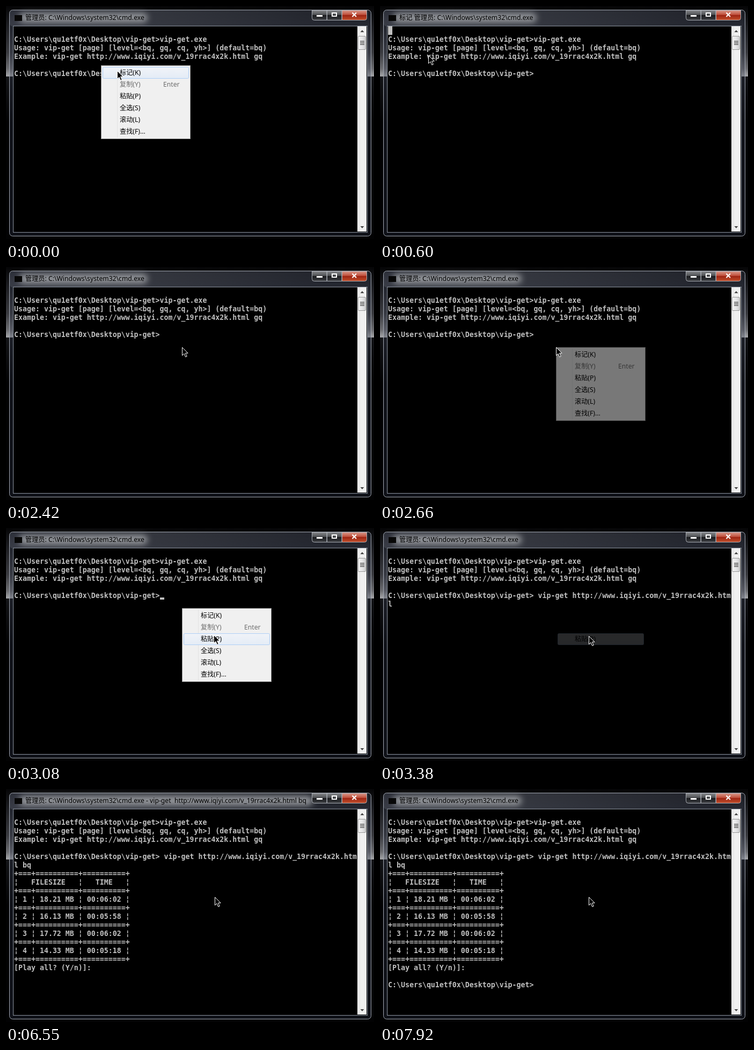
Animation of 686x436 px, one loop 8 s. Source, as an HTML page:

```html
<!DOCTYPE html>
<html lang="zh-CN">
<head>
<meta charset="utf-8">
<title>Console</title>
<style>
html, body { margin: 0; width: 100%; height: 100%; overflow: hidden; background: #000; }
svg { display: block; width: 686px; height: 436px; }
text { white-space: pre; }
.term { font: bold 13.288px "DejaVu Sans Mono", monospace; fill: #c0c0c0; }
.term .inverse { fill: #000; }
.ui { font: 12.2px "Noto Sans", "Noto Sans CJK SC", "Noto Sans CJK", sans-serif; fill: #000; }
.ui .off { fill: #6d6d6d; }
</style>
</head>
<body>
<svg viewBox="0 0 686 436">
  <defs>
    <linearGradient id="desk" x2="0" y2="1">
      <stop offset="0" stop-color="#050506"/><stop offset=".08" stop-color="#1b1c20"/>
      <stop offset=".2" stop-color="#3a3b40"/><stop offset=".27" stop-color="#6c6d71"/>
      <stop offset=".301" stop-color="#a6a7aa"/><stop offset=".304" stop-color="#131417"/>
      <stop offset=".5" stop-color="#020203"/>
    </linearGradient>
    <linearGradient id="sheen" x2="1" y2=".25">
      <stop offset="0" stop-color="#8a90a4" stop-opacity=".2"/>
      <stop offset=".4" stop-color="#9a9da6" stop-opacity=".22"/>
      <stop offset=".75" stop-color="#9a9da6" stop-opacity=".12"/>
      <stop offset="1" stop-color="#9a9da6" stop-opacity=".04"/>
    </linearGradient>
    <linearGradient id="dark" x2="0" y2="1">
      <stop offset="0" stop-color="#85878a"/><stop offset=".45" stop-color="#505255"/>
      <stop offset=".5" stop-color="#1b1c1f"/><stop offset="1" stop-color="#3c3e42"/>
    </linearGradient>
    <linearGradient id="red" x2="0" y2="1">
      <stop offset="0" stop-color="#d99a8c"/><stop offset=".45" stop-color="#c0503c"/>
      <stop offset=".5" stop-color="#9c2413"/><stop offset="1" stop-color="#c4502c"/>
    </linearGradient>
    <linearGradient id="thumb">
      <stop offset="0" stop-color="#f6f6f6"/><stop offset=".5" stop-color="#e6e6e7"/>
      <stop offset="1" stop-color="#cfd0d2"/>
    </linearGradient>
    <linearGradient id="track">
      <stop offset="0" stop-color="#e4e4e4"/><stop offset=".4" stop-color="#f0f0f0"/>
      <stop offset="1" stop-color="#f0f0f0"/>
    </linearGradient>
    <linearGradient id="hover" x2="0" y2="1">
      <stop offset="0" stop-color="#f0f3f8"/><stop offset="1" stop-color="#e4ecf6"/>
    </linearGradient>
    <filter id="blur" x="-20%" y="-80%" width="140%" height="260%"><feGaussianBlur stdDeviation="6"/></filter>
    <clipPath id="bar"><rect x="8" y="8" width="560" height="29"/></clipPath>
  </defs>

  <rect width="686" height="436" fill="url(#desk)"/>
  <rect x="6.500" y="7.500" width="674" height="423" rx="6" fill="#30364a" fill-opacity=".3" stroke="#a3a9b4"/>
  <rect x="7" y="8" width="673" height="30" rx="5" fill="url(#sheen)"/>

  <g id="title" class="ui"></g>
  <rect x="16" y="17" width="14" height="11" fill="#080808"/>

  <g stroke="#a9adb4">
    <path d="M570.500 8V22.500Q570.500 26.500 574.500 26.500H598V8Z" fill="url(#dark)"/>
    <path d="M598.500 8V26.500H626V8Z" fill="url(#dark)"/>
    <path d="M626.500 8V26.500H668.500Q672.500 26.500 672.500 22.500V8Z" fill="url(#red)"/>
  </g>
  <rect x="579" y="17" width="11" height="3" fill="#fff"/>
  <rect x="608" y="13" width="8" height="6" fill="none" stroke="#fff" stroke-width="2"/>
  <path d="M645.500 12.500L653 20M653 12.500L645.500 20" stroke="#fff" stroke-width="2.200"/>

  <rect x="13.500" y="37.500" width="660" height="386" fill="#000" stroke="#8e96a2"/>
  <rect x="655" y="38" width="17" height="384" fill="url(#track)"/>
  <path d="M660.500 49L664 45L667.500 49Z M660.500 412L664 416L667.500 412Z" fill="#444"/>
  <rect x="656.500" y="56.500" width="14" height="25" rx="1.500" fill="url(#thumb)" stroke="#979797"/>
  <path d="M660 66H668M660 69H668M660 72H668" stroke="#555" stroke-width="1.500"/>

  <g id="screen" class="term"></g>
  <g id="popup" class="ui"></g>
  <path id="mouse" d="M.5 .5V15.500L4 12.200L6.700 18.300L9.200 17.200L6.500 11.200H11.200Z" fill="#000" stroke="#fff"/>
</svg>

<script>
const LOOP = 8000, CELL = 8, ROW = 16, LEFT = 15, TOP = 38;
const $ = id => document.getElementById(id);
const esc = s => s.replace(/&/g, '&amp;').replace(/</g, '&lt;');
const clamp = v => Math.max(0, Math.min(1, v));

const PROMPT = String.raw`C:\Users\qu1etf0x\Desktop\vip-get>`;
const COMMAND = ' vip-get http://www.iqiyi.com/v_19rrac4x2k.html';
const EXAMPLE = 'Example:' + COMMAND + ' gq';
const BASE = ['', PROMPT + 'vip-get.exe',
  'Usage: vip-get [page] [level=<bq, gq, cq, yh>] (default=bq)', EXAMPLE, ''];
const SEP = '+===+==========+==========+';
const PARTS = ['18.21 MB ¦ 00:06:02', '16.13 MB ¦ 00:05:58',
  '17.72 MB ¦ 00:06:02', '14.33 MB ¦ 00:05:18'];
const TABLE = [SEP, '¦   FILESIZE   ¦   TIME   ¦', SEP,
  ...PARTS.flatMap((part, i) => [`¦ ${i + 1} ¦ ${part} ¦`, SEP]), '[Play all? (Y/n)]:'];

// Caret: from, to, column, row
const CARET = [[840, 1330, 34, 5], [1870, 2420, 34, 5], [2900, 3200, 34, 5],
  [3440, 3930, 1, 6], [4490, 4980, 2, 6], [6040, 6550, 0, 7], [7610, 7920, 0, 19]];

// Pointer: time, x, y
const PATH = [[0, 207, 121], [240, 207, 121], [600, 90, 92], [660, 84, 92], [840, 111, 93],
  [1080, 205, 95], [1320, 345, 97], [1560, 447, 97], [1810, 447, 97], [2050, 328, 150],
  [2720, 328, 150], [3080, 387, 200], [3200, 387, 200], [3260, 389, 202], [LOOP, 389, 202]];

// Menus: open, click, x, y, chosen item
const MENUS = [[-600, 60, 177, 111, 0], [2600, 3200, 328, 150, 2]];
const ITEMS = ['标记(K)', '复制(Y)', '粘贴(P)', '全选(S)', '滚动(L)', '查找(F)...'];

const TITLE = String.raw`管理员: C:\Windows\system32\cmd.exe`;

function pointer(t) {
  const i = PATH.findIndex(p => p[0] > t) - 1;
  const [t0, x0, y0] = PATH[i], [t1, x1, y1] = PATH[i + 1];
  const k = Math.floor((t - t0) / 60) * 60 / (t1 - t0);
  return [Math.round(x0 + (x1 - x0) * k), Math.round(y0 + (y1 - y0) * k)];
}

function title(t) {
  let [text, end] = [TITLE, 260];
  if (t >= 120 && t < 2300) [text, end] = ['标记 ' + TITLE, 288];
  if (t >= 5530 && t < 7920) [text, end] = [TITLE + ' - ' + COMMAND.trim().replace(' ', '  ') + ' bq', 568];
  return `<rect x="24" y="13" width="${end - 20}" height="18" rx="9" fill="#93959a" filter="url(#blur)"/>
    <text x="36" y="26" clip-path="url(#bar)">${esc(text)}</text>`;
}

function lines(t) {
  let entry = PROMPT + (t >= 3200 ? COMMAND : '');
  if (t >= 4490) entry += ' ';
  if (t >= 5040) entry += 'b';
  if (t >= 5220) entry += 'q';
  const out = [...BASE, entry.slice(0, 80)];
  if (entry.length > 80) out.push(entry.slice(80));
  if (t >= 6550) out.push(...TABLE);
  if (t >= 7920) out.push('', PROMPT);
  return out;
}

const line = (s, col, row, cls = '') =>
  s && `<text class="${cls}" x="${LEFT + col * CELL}" y="${TOP + row * ROW + 13}">${esc(s)}</text>`;
const block = (col, row, cols, y = 0) =>
  `<rect x="${LEFT + col * CELL}" y="${TOP + row * ROW + y}" width="${cols * CELL}" height="${ROW - y}"/>`;

function screen(t, x) {
  let out = lines(t).map((s, row) => line(s, 0, row)).join('');
  if (t >= 120 && t < 660) out += block(0, 0, 1);
  if (t >= 660 && t < 2300) {
    const last = t < 1560 ? Math.floor((x - LEFT) / CELL) : 54;
    out += block(8, 3, last - 7) + line(EXAMPLE.slice(8, last + 1), 8, 3, 'inverse');
  }
  const caret = CARET.find(([from, to]) => t >= from && t < to);
  if (caret) out += block(caret[2], caret[3], 1, 12);
  return out;
}

function menuItem(i, x, y, lit) {
  const top = y + 3 + i * 22, cls = i === 1 ? 'off' : '';
  const label = (s, dx) => `<text class="${cls}" x="${x + dx}" y="${top + 15}">${s}</text>`;
  return (lit ? `<rect x="${x + 3.5}" y="${top + .5}" width="160" height="21" rx="2" fill="url(#hover)" stroke="#aecff7"/>` : '')
    + label(ITEMS[i], 35) + (i === 1 ? label('Enter', 116) : '');
}

function popup(t, mx, my) {
  return MENUS.map(([open, click, x, y, chosen]) => {
    if (t < open || t >= click + 240) return '';
    if (t >= click) {
      const fade = 1 - Math.floor((t - click) / 60) * .277;
      return `<g opacity="${fade.toFixed(2)}">${menuItem(chosen, x, y, true)}</g>`;
    }
    const over = mx > x + 3 ? Math.floor((my - y - 3) / 22) : -1;
    const alpha = clamp((Math.floor((t - open) / 60) + 1) / 4);
    return `<g opacity="${alpha}">
      <rect x="${x + .5}" y="${y + .5}" width="166" height="137" fill="#f0f0f0" stroke="#979797"/>
      <path d="M${x + 30.5} ${y + 3}v132" stroke="#e2e3e3"/>
      ${ITEMS.map((_, i) => menuItem(i, x, y, i === over)).join('')}</g>`;
  }).join('');
}

const shown = {};
function put(id, html) {
  if (shown[id] !== html) $(id).innerHTML = shown[id] = html;
}

const start = performance.now();
function draw(now) {
  const t = Math.max(0, now - start) % LOOP;
  const [x, y] = pointer(t);
  put('title', title(t));
  put('screen', screen(t, x));
  put('popup', popup(t, x, y));
  $('mouse').setAttribute('transform', `translate(${x} ${y})`);
  requestAnimationFrame(draw);
}
draw(start);
</script>
</body>
</html>
```
